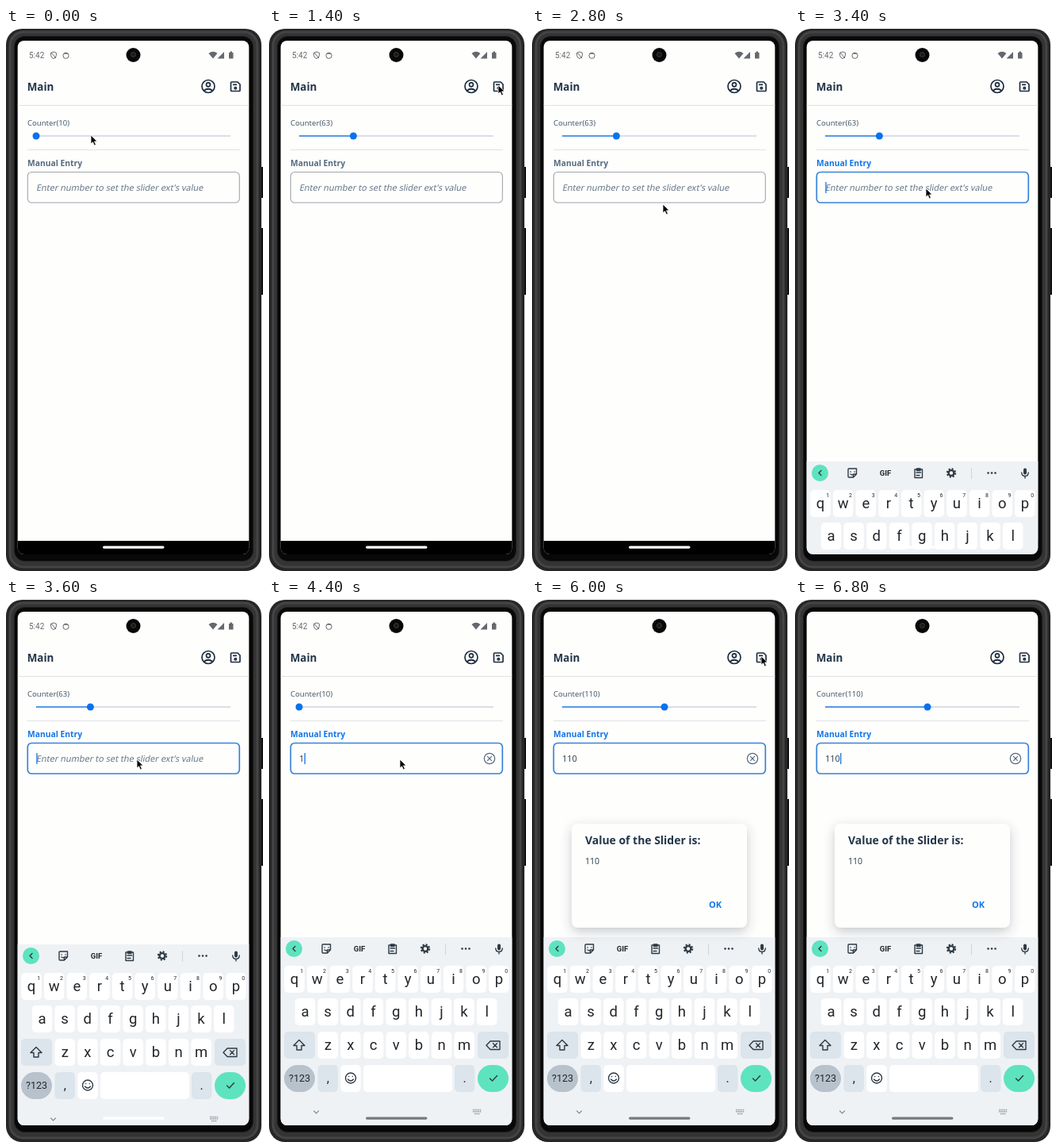
Animation of 324x684 px, one loop 7200 ms. Source, as an HTML page:

```html
<!DOCTYPE html>
<html lang="en">
<head>
<meta charset="utf-8">
<title>Slider and manual entry</title>
<style>
  html, body { margin: 0; width: 100%; height: 100%; overflow: hidden; background: #fff; }
  svg { display: block; width: 324px; height: 684px; font-family: "Noto Sans", "Open Sans", sans-serif; }
  .bold { font-weight: 700; }
  .ink { fill: #223548; }
  .kb, .clock { font-family: Roboto, sans-serif; }
  .kb text { text-anchor: middle; fill: #22262a; }
  .line { fill: none; stroke: #2f3a44; stroke-width: 1.4; stroke-linecap: round; stroke-linejoin: round; }
</style>
</head>
<body>
<svg viewBox="0 0 324 684">
  <defs>
    <clipPath id="screen"><rect x="14.700" y="16" width="291.600" height="647" rx="8"/></clipPath>
    <filter id="soft" x="-20%" y="-20%" width="140%" height="150%">
      <feDropShadow dx="0" dy="5" stdDeviation="7" flood-color="#34424f" flood-opacity=".28"/>
    </filter>
  </defs>

  <!-- phone body -->
  <path d="M320 175h4v39h-4zM320 252h4v84h-4z" fill="#111"/>
  <rect x="0" y="1" width="322" height="683" rx="20" fill="#262627"/>
  <rect x="5" y="5" width="312" height="674" rx="17" fill="#343435" stroke="#444446" stroke-width="3"/>
  <rect x="10.500" y="10.500" width="301" height="661" rx="13" fill="#080808" stroke="#1c1c1d"/>

  <g clip-path="url(#screen)">
    <rect x="14" y="16" width="293" height="647" fill="#fefefd"/>

    <g id="status" fill="#65696d">
      <text class="clock" x="29" y="38" font-size="10">5:42</text>
      <path d="M60 30l3.400 1.300v3q0 3-3.400 4.300q-3.400-1.300-3.400-4.300v-3zM57 31l6 7" fill="none" stroke="#65696d"/>
      <circle cx="75.500" cy="34.800" r="3.600" fill="none" stroke="#65696d"/>
      <path d="M72.500 32.800q3-3.500 6 0z"/>
      <path d="M255.500 32q5.500-4.500 11 0l-5.500 6.500zM275 30v8.500h-8.500z"/>
      <path d="M281 31h1.500v-1.500h2.500V31h1.500v7.500H281z"/>
    </g>
    <circle cx="160.500" cy="34" r="9" fill="#080808"/>
    <circle cx="160.500" cy="33.500" r="3" fill="#1a1a1a" stroke="#3c3c3c"/>

    <text class="bold ink" x="26.700" y="79" font-size="13.400">Main</text>
    <g fill="none" stroke="#1d2d3e" stroke-width="1.700">
      <circle cx="255" cy="73.500" r="8"/>
      <circle cx="255" cy="71.300" r="2.500"/>
      <path d="M249.500 79q5.500-4.500 11 0"/>
      <path d="M284.500 68h7.500l3 3v7.500q0 1-1 1h-9.500q-1 0-1-1v-9.500q0-1 1-1z"/>
      <path d="M286 71.300h5"/>
      <circle cx="289.300" cy="75.800" r="1.200"/>
    </g>
    <path d="M14 97.500h293M27 153.500h268" stroke="#dfe2e5"/>

    <text id="counter" x="27" y="122.500" font-size="9.550" fill="#475a6c"></text>
    <path d="M38 136h245" stroke="#b8c0c9" stroke-width="1.200"/>
    <path id="fill" stroke="#2a82ea" stroke-width="1.500"/>
    <circle id="thumb" cy="136" r="4.500" fill="#0872ee"/>

    <text id="label" class="bold" x="27" y="174" font-size="10.300">Manual Entry</text>
    <rect id="field" x="27.300" y="181.500" width="267" height="38.500" rx="5" fill="#fefefd"/>
    <text id="hint" transform="translate(38 205) skewX(-11)" font-size="10.950" fill="#667788">Enter number to set the slider ext's value</text>
    <text id="entry" x="38" y="205" font-size="10.950" fill="#344554"></text>
    <rect id="caret" y="194" width="1.300" height="14" fill="#1276e8"/>
    <g id="clear" fill="none" stroke="#556b81" stroke-width="1.200">
      <circle cx="278" cy="201" r="6.700"/><path d="M275.200 198.200l5.600 5.600m0-5.600l-5.600 5.600"/>
    </g>

    <rect id="nav" x="14" y="646" width="293" height="17" fill="#000"/>
    <g id="kb" class="kb">
      <rect x="14" y="426" width="293" height="240" fill="#eff2f5"/>
      <circle cx="31.500" cy="440.500" r="10.500" fill="#5ee3bf"/>
      <g class="line">
        <path d="M33 437.500l-3 3 3 3"/>
        <path d="M68 435h9.500v7l-4 4H68q-1 0-1-1v-9q0-1 1-1zM77.500 442h-4v4M70 439h.2M75 439h.2M70 442q2 1.500 3 .5"/>
        <path d="M151 436h9.500v10.500H151zM153.500 435h4.500v2.500h-4.500zM153 440h5.500M153 443.500h4"/>
        <g stroke-linecap="butt">
          <circle cx="197" cy="440.500" r="5.200" stroke-width="2" stroke-dasharray="2.1 1.984"/>
          <circle cx="197" cy="440.500" r="3.400" stroke-width="2.400"/>
        </g>
        <path d="M243.500 440.500h.1M248 440.500h.1M252.500 440.500h.1" stroke-width="2.600"/>
        <path d="M290 436.500v4" stroke-width="4"/>
        <path d="M285.800 440q0 4.500 4.200 4.500t4.200-4.500M290 444.500v2.500"/>
      </g>
      <path d="M222.500 434v14" stroke="#cfd5da"/>
      <text class="bold" x="114" y="444" font-size="9.500">GIF</text>
      <g id="keys"></g>
      <g class="line">
        <path d="M38 555.500l7 7h-4v5.500h-6v-5.500h-4z"/>
        <path d="M279 557h12v10.500h-12l-5-5.250zM282.500 559.700l5 5m0-5l-5 5"/>
        <circle cx="103" cy="603.500" r="6.500"/>
        <path d="M100.700 601.500h.1M105.300 601.500h.1M99.500 605q3.500 4 7 0"/>
        <path d="M278.500 604l3 3 6-6.500"/>
        <path d="M56.500 644.800l3 3 3-3" stroke="#7a838a" stroke-width="1.200"/>
      </g>
      <path d="M257 643.500h11M257 645.700h11M259 648.500h7" stroke="#8b949b" stroke-width="1.400" stroke-dasharray="1.400 .8"/>
    </g>
    <rect id="handle" x="122" y="652.500" width="77.500" height="3.200" rx="1.600"/>

    <g id="dialog">
      <rect x="50" y="283" width="221" height="131" rx="8" fill="#fefefd" filter="url(#soft)"/>
      <text class="bold ink" x="67" y="308.500" font-size="13.950">Value of the Slider is:</text>
      <text id="shown" x="67" y="333.500" font-size="10.500" fill="#344554"></text>
      <text class="bold" x="223" y="389" font-size="11" fill="#1276e8">OK</text>
    </g>
  </g>
  <path id="mouse" d="M0 0v11l2.500-2.300 1.900 4.300 2-.9-1.900-4.200h3.500z" fill="#000" stroke="#fff" stroke-width=".8"/>
</svg>

<script>
const $ = id => document.getElementById(id);
const set = (id, attrs) => { for (const k in attrs) $(id).setAttribute(k, attrs[k]); };
const show = (id, on) => set(id, { visibility: on ? 'visible' : 'hidden' });

// Keyboard keys
const key = (x, y, w, fill, rx = 5) =>
  `<rect x="${x}" y="${y}" width="${w}" height="34" rx="${rx}" fill="${fill}"/>`;
const glyph = (x, y, size, s) => `<text x="${x}" y="${y}" font-size="${size}">${s}</text>`;
const PITCH = 28.65;
let keys = '';
[['qwertyuiop', 32, 462], ['asdfghjkl', 45.5, 503], ['zxcvbnm', 74.3, 545]].forEach(([row, x0, y], r) => {
  [...row].forEach((c, i) => {
    const x = x0 + i * PITCH;
    keys += key(x - 12.7, y, 25.4, '#fff') + glyph(x, y + 23, 18.5, c);
    if (!r) keys += glyph(x + 9.3, y + 8.5, 7, (i + 1) % 10);
  });
});
keys += key(19, 545, 39, '#dce4ec') + key(263, 545, 39, '#dce4ec')
  + key(19, 587, 39, '#b7c2cc', 17) + glyph(38.5, 608, 12.5, '?123')
  + key(61.5, 587, 25.4, '#dce4ec') + glyph(74.3, 609, 16, ',')
  + key(90.3, 587, 25.4, '#fff') + key(119, 587, 112, '#fff')
  + key(234, 587, 25.4, '#dce4ec') + glyph(246.7, 609, 16, '.')
  + key(263, 587, 39, '#5ee3bf', 17);
$('keys').innerHTML = keys;

// Each track is a list of [start ms, value...]; values hold until the next entry
const at = (track, t) => track.filter(s => s[0] <= t).pop();
const mouse = [[0, 107, 135], [1000, 155, 118], [1200, 245, 86], [1400, 289, 72],
  [1800, 262, 260], [2000, 230, 382], [2600, 200, 300], [2800, 165, 222], [3000, 165, 202],
  [5000, 215, 162], [5200, 270, 118], [5400, 285, 82], [5600, 289, 72], [6200, 306, 68], [6400, 330, 66]];
const typed = [[0, ''], [4200, '1'], [4600, '11'], [4800, '110']];
const counter = [[0, 10], [400, 63], [4200, 10], [4600, 11], [4800, 110]];
const keyboard = [[0, 240], [3400, 120], [3600, 9], [3800, 0]];
const caret = [[0, 0], [3200, 1], [3800, 0], [4200, 1], [5000, 0], [5400, 1], [6000, 0], [6400, 1]];

function draw() {
  const t = Math.floor(performance.now() % 7200 / 200) * 200;
  const value = at(counter, t)[1], text = at(typed, t)[1], drop = at(keyboard, t)[1];
  const focus = t >= 3200, x = 38 + (value - 10) * 1.29;
  const [, mx, my] = at(mouse, t);

  $('counter').textContent = `Counter(${value})`;
  $('shown').textContent = value;
  $('entry').textContent = text;
  set('fill', { d: `M38 136H${x}` });
  set('thumb', { cx: x });
  set('label', { fill: focus ? '#1276e8' : '#556b81' });
  set('field', { stroke: focus ? '#3982d8' : '#a0a6ac', 'stroke-width': focus ? 1.7 : 1.1 });
  set('caret', { x: 38.3 + text.length * 6.26 });
  set('kb', { transform: `translate(0 ${drop})` });
  set('handle', { fill: drop ? '#fff' : '#74797e' });
  set('mouse', { transform: `translate(${mx} ${my})` });

  show('hint', !text);
  show('clear', text);
  show('caret', at(caret, t)[1]);
  show('kb', drop < 240);
  show('nav', drop > 9);
  show('dialog', t >= 1600 && t < 2200 || t >= 6000);
  show('status', t < 1600 || t >= 2600 && t < 6000);
  requestAnimationFrame(draw);
}
draw();
</script>
</body>
</html>
```
